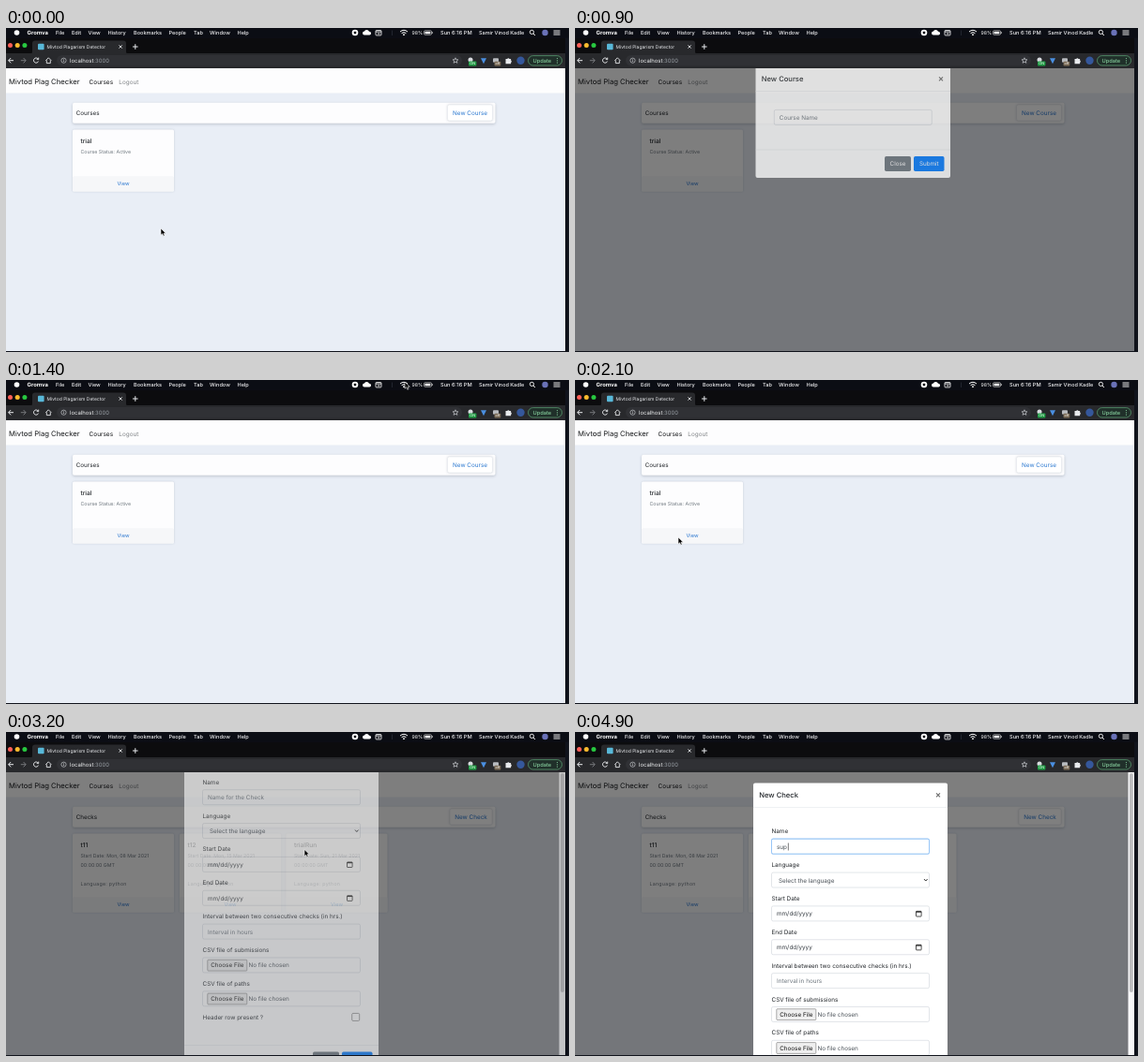
An HTML page that plays this animation: 600 by 346 pixels, repeating every 5000 ms.

```html
<!DOCTYPE html>
<html lang="en">
<head>
<meta charset="utf-8">
<title>Plag Checker</title>
<style>
html, body { margin: 0; width: 100%; height: 100%; overflow: hidden; background: #0b0d14; }
svg { display: block; width: 100%; height: 100%; }
text { font-family: Inter, "Liberation Sans", sans-serif; text-rendering: geometricPrecision; white-space: pre; }
.lift { filter: drop-shadow(0 1.5px 1.6px rgba(40, 50, 70, .24)); }
.soft { filter: drop-shadow(0 .5px .8px rgba(40, 50, 70, .18)); }
</style>
</head>
<body>
<svg id="stage" viewBox="0 0 600 346"></svg>
<script>
const INK = '#212529', GREY = '#6c757d', BLUE = '#2b78d0', LINE = '#ced4da';
const USER = 'Samir Vinod Kadle';

// y is the vertical middle of the capitals
const text = (x, y, s, size = 6.4, fill = INK, more = '') =>
  `<text x="${x}" y="${y + size * .36}" font-size="${size}" fill="${fill}" ${more}>${s}</text>`;
const rect = (x, y, w, h, fill, r = 0, more = '') =>
  `<rect x="${x}" y="${y}" width="${w}" height="${h}" fill="${fill}" rx="${r}" ${more}/>`;
const dot = (x, y, r, fill, more = '') => `<circle cx="${x}" cy="${y}" r="${r}" fill="${fill}" ${more}/>`;
const line = (d, stroke = '#e8eaed', w = .9, more = '') =>
  `<path d="${d}" fill="none" stroke="${stroke}" stroke-width="${w}" ${more}/>`;
const group = (id, body, more = '') => `<g id="${id}" ${more}>${body}</g>`;
const mid = 'text-anchor="middle"', medium = 'font-weight="500"', bold = 'font-weight="600"';

function menuBar() {
  const items = [[53, 'File'], [70, 'Edit'], [87.5, 'View'], [108.5, 'History'], [136, 'Bookmarks'],
    [173.5, 'People'], [200, 'Tab'], [217, 'Window'], [246.5, 'Help']];
  return rect(0, 0, 600, 10.5, '#0b0d14') + dot(11.5, 5, 2.8, '#fff') +
    text(22.5, 5, 'Gromva', 5.9, '#fff', 'font-weight="700"') +
    items.map(([x, s]) => text(x, 5, s, 5.6, '#f2f2f4', medium)).join('') +
    dot(372, 5, 3.3, '#fff') + rect(370.8, 3.8, 2.4, 2.4, '#0b0d14', .5) +
    '<path d="M382 7.5a2 2 0 0 1 0-4a2.8 2.8 0 0 1 5 .2a1.9 1.9 0 0 1 .3 3.8z" fill="#fff"/>' +
    rect(394, 2.5, 6, 5.4, 'none', .8, 'stroke="#fff" stroke-width=".8"') + line('M394 4h6M396 6h2.5', '#fff') +
    rect(411, 2.5, 1, 5.5, '#22252e') +
    line('M420 4q4-3.4 8 0M421.6 5.6q2.4-2 4.8 0', '#fff', 1) + dot(424, 7.2, .9, '#fff') +
    text(432.5, 5, '98%', 5.2, '#fff') +
    rect(445.5, 2.8, 8, 4.4, 'none', 1, 'stroke="#ccc" stroke-width=".7"') +
    rect(446.5, 3.8, 5.8, 2.4, '#fff') + rect(454.2, 4.2, .8, 1.6, '#ccc') +
    text(463, 5, 'Sun 6:16 PM', 5.7, '#f2f2f4', medium) + text(504, 5, USER, 5.5, '#f2f2f4', medium) +
    dot(560.4, 4.4, 2.1, 'none', 'stroke="#fff" stroke-width=".9"') + line('M562 6l2 2', '#fff') +
    dot(574.5, 5, 3.2, '#6a72b8') + line('M583.5 3h7M583.5 5h7M583.5 7h7', '#fff', .9);
}

function browser() {
  const lights = ['#ff5f57', '#febc2e', '#28c840'];
  return rect(0, 10.5, 596, 17, '#0c0c0e') +
    lights.map((c, i) => dot(4.5 + i * 7.7, 18.5, 2.5, c)).join('') +
    '<path d="M26 27.5q2 0 2-2v-9q0-3 3-3h94q3 0 3 3v9q0 2 2 2z" fill="#28292c"/>' +
    rect(34, 16.7, 6.6, 6.6, '#58b8d8', 1) +
    text(43.5, 20, 'Mivtod Plagarism Detector', 5, '#e8eaed') +
    line('M120.5 18.4l3.2 3.2m0-3.2l-3.2 3.2') + line('M135 20h5.6M137.8 17.2v5.6', '#e8eaed', 1) +
    rect(0, 27, 596, 16, '#28292c') + rect(54, 29, 432, 11.4, '#303135', 5.7) +
    line('M8 34.7H2.8M5.2 32l-2.6 2.7l2.6 2.7', '#e8eaed', 1) +
    line('M15.8 34.7H21M18.6 32l2.6 2.7l-2.6 2.7', '#77797d', 1) +
    line('M34.3 33.2a2.6 2.6 0 1 0 .2 2.4', '#e8eaed', 1) + line('M34.7 31.6v2h-2') +
    line('M42.3 34.8l3-3l3 3M43.3 34.4v3.2h4v-3.2') +
    dot(61.5, 34.7, 2.6, 'none', 'stroke="#c4c7cb" stroke-width=".7"') + line('M61.5 34.4v1.7M61.5 33v.7', '#c4c7cb', .8) +
    text(68, 34.7, 'localhost<tspan fill="#9aa0a6">:3000</tspan>', 5.95, '#f1f3f4') +
    line('M479 31.8l.8 2h2.1l-1.6 1.4l.6 2.1l-1.9-1.2l-1.9 1.2l.6-2.1l-1.6-1.4h2.1z', '#d0d3d7', .7) +
    dot(495, 34, 2.5, '#d9dce0') + rect(493, 35.6, 8.4, 5, '#1e9b43', 1) + text(497.2, 38.1, 'ON', 3.8, '#fff', mid) +
    '<path d="M506 32.2h6l-3 6z" fill="#4a90e2"/>' +
    rect(519, 32.3, 6, 4.5, '#b9bcc0', 1) + rect(520.5, 35.8, 6.8, 4.6, '#7a6a55', 1) + text(523.9, 38.1, 'off', 3.6, '#fff', mid) +
    '<path d="M532.5 33h1.7a1.2 1.2 0 0 1 2.3 0h1.6v1.6a1.2 1.2 0 0 1 0 2.2v1.4h-5.6z" fill="#e8eaed"/>' +
    dot(548.5, 34.7, 4.2, '#35579b') +
    rect(556.5, 29.6, 36, 10.4, '#20302a', 5.2, 'stroke="#5fa878" stroke-width=".7"') +
    text(561.5, 34.8, 'Update', 5.7, '#86cf9d', medium) + [32.5, 34.8, 37.1].map(y => dot(587.5, y, .6, '#86cf9d')).join('');
}

const button = (x, w, label) =>
  rect(x, 82, w, 17, '#fff', 1.8, 'class="soft" stroke="#dfe3e8" stroke-width=".5"') +
  text(x + w / 2, 90.6, label, 6.35, BLUE, mid);

function card(x, h, title, lines) {
  return `<g class="soft">${rect(x, 108.5, 108, h, '#fdfdfe', 1.5)}</g>` +
    rect(x, 92.2 + h, 108, 16.3, '#f6f7f9', 1.5) +
    text(x + 8.5, 120.8, title, 6.6, INK, medium) +
    lines.map(([y, s, gap = 0]) => text(x + 8.5, y, s, 5.25, GREY, `letter-spacing="${gap}"`)).join('') +
    text(x + 54, 100.4 + h, 'View', 5.6, BLUE, mid);
}

const check = (x, title, date) => card(x, 84, title,
  [[132, 'Start Date: ' + date], [142, '00:00:00 GMT'], [162, 'Language: python', .28]]);

function page() {
  return rect(0, 43, 596, 302, '#e9eef6') + rect(0, 43, 596, 26.5, '#fdfdfe') +
    text(3, 57.6, 'Mivtod Plag Checker', 7.7, '#151719') + text(88.5, 57.6, 'Courses', 6.5, '#151719') +
    text(120.3, 57.6, 'Logout', 6.4, '#7f8285') +
    rect(71, 79.8, 450.5, 22, '#fdfdfe', 1.8, 'class="lift"') +
    group('courses', text(74.7, 90.7, 'Courses', 6.3) + button(470.5, 48, 'New Course') +
      card(71, 66, 'trial', [[132, 'Course Status: Active']])) +
    group('checks', text(74.7, 90.7, 'Checks', 6.3) + button(473, 45, 'New Check') +
      check(71, 't11', 'Mon, 08 Mar 2021') + check(185, 't12', 'Mon, 15 Mar 2021') +
      check(298.5, 'trialRun', 'Sun, 21 Mar 2021'));
}

const field = (x, y, hint = '', pad = 5.5, fill = GREY) =>
  rect(x, y, 168, 16, '#fff', 1.7, `stroke="${LINE}" stroke-width=".6"`) + text(x + pad, y + 8.2, hint, 6.35, fill);

// dialog shell with its header and footer
function dialog(x, y, w, h, title, body) {
  const foot = y + h - 16.5;
  return rect(x, y, w, h, '#fff', 2) + text(x + 6.3, y + 12.9, title, 7.6, INK, medium) +
    line(`M${x + w - 12} ${y + 10.8}l4 4m0-4l-4 4`, '#6b6b6b', 1.1) +
    line(`M${x} ${y + 26}h${w}M${x} ${y + h - 30}h${w}`, '#dee2e6', .5) + body +
    [[-70, 28, 'Close', GREY], [-39, 32.5, 'Submit', '#007bff']].map(([dx, bw, s, c]) =>
      rect(x + w + dx, foot - 6.5, bw, 16, c, 1.7) + text(x + w + dx + bw / 2, foot + 1.6, s, 6.3, '#fff', mid)).join('');
}

function checkForm() {
  const x = 209.5, top = i => 114.2 + i * 35.85;
  const date = y => field(x, y, 'mm/dd/yyyy', 5.5, '#343a40') +
    rect(363.5, y + 5.5, 5.6, 5.6, 'none', .5, 'stroke="#222" stroke-width=".8"') + line(`M363.5 ${y + 6.2}h5.6`, '#222', 1.2);
  const file = y => field(x, y, 'No file chosen', 49, '#495057') +
    rect(x + 5.3, y + 2.3, 42, 11.8, '#efefef', .8, 'stroke="#767676" stroke-width=".6"') +
    text(x + 26.3, y + 8.2, 'Choose File', 6.3, '#111', mid);
  const rows = [
    ['Name', y => group('name', field(x, y))],
    ['Language', y => field(x, y, 'Select the language', 7.5, '#495057') + line(`M372 ${y + 7}l1.8 2l1.8-2`, '#333', 1)],
    ['Start Date', date], ['End Date', date],
    ['Interval between two consecutive checks (in hrs.)', y => field(x, y, 'Interval in hours')],
    ['CSV file of submissions', file], ['CSV file of paths', file],
    ['Header row present ?', y => rect(368.7, y - 12.2, 8, 8, '#fff', 1.2, 'stroke="#767676" stroke-width=".7"')]
  ];
  return rows.map(([s, draw], i) => text(x, top(i) - 8.2, s, 6.35) + draw(top(i))).join('');
}

const ARROW = '<path d="M0 0v7.2l1.7-1.5l1.1 2.5l1.3-.6l-1.1-2.4h2.3z" fill="#000" stroke="#fff" stroke-width=".6"/>';
const HAND = '<path d="M-.8 4.8V.7q.8-1.2 1.6 0V3l2.7.5q.9.2.8 1.2l-.7 3.4h-3.9l-2.4-3q.6-1.3 1.9-.3z" fill="#fff" stroke="#000" stroke-width=".7"/>';
const BEAM = '<path d="M-1.5-3.8Q0-3.8 0-2.8Q0-3.8 1.5-3.8M0-2.8V2.8M-1.5 3.8Q0 3.8 0 2.8Q0 3.8 1.5 3.8" fill="none" stroke="#111" stroke-width=".8"/>';

const stage = document.getElementById('stage');
stage.innerHTML =
  `<clipPath id="view">${rect(0, 43, 596, 302, '#000')}</clipPath>` +
  rect(0, 0, 600, 346, '#10131b') + browser() +
  `<g clip-path="url(#view)">` + page() + group('shade', rect(0, 43, 596, 302, '#000')) +
  group('courseBox', dialog(192.5, 54.5, 207.5, 118.5, 'New Course', field(212.3, 100.4, 'Course Name'))) +
  group('checkBox', group('sheet', dialog(190, 54.5, 207, 362.5, 'New Check', checkForm())) +
    rect(589.5, 43, 6.5, 302, '#f8f8f9') + rect(591, 44, 3.8, 234, '#bdbdbf', 1.9)) +
  group('hints', '') + '</g>' + menuBar() + group('cursor', '');

const $ = id => document.getElementById(id);
const show = (id, opacity) => {
  $(id).setAttribute('opacity', opacity);
  $(id).setAttribute('display', opacity ? 'inline' : 'none');
};
const move = (id, x, y) => $(id).setAttribute('transform', `translate(${x} ${y})`);

// linear value at t; keys are [time, value]
function at(keys, t) {
  const i = keys.findIndex(k => k[0] > t);
  if (i < 0) return keys[keys.length - 1][1];
  if (i === 0) return keys[0][1];
  const [t0, a] = keys[i - 1], [t1, b] = keys[i];
  return a + (b - a) * (t - t0) / (t1 - t0);
}

const PATH = [[0, 165, 214], [200, 440, 108], [300, 440, 108], [500, 494, 91], [700, 494, 91],
  [1000, 385, 145], [1200, 345, 145], [1400, 425, 2], [1500, 410, 62], [1800, 130, 120], [2100, 110, 168],
  [2300, 165, 225], [2500, 170, 200], [2700, 126, 166], [2800, 126, 166], [3000, 494, 96], [3100, 440, 108],
  [3200, 318, 125.5], [3500, 278, 121], [3800, 267, 119], [4000, 269, 119]];
const PATH_X = PATH.map(([t, x]) => [t, x]), PATH_Y = PATH.map(([t, , y]) => [t, y]);
const SHADE = [[600, 0], [800, .5], [1200, .5], [1400, 0], [3000, 0], [3100, .5]];
const COURSE = [[800, 0], [900, .76], [1000, 1], [1200, 1], [1300, 0]];
const COURSE_Y = [[800, -29], [900, -13], [1000, 0], [1200, 0], [1300, -20]];
const CHECK = [[3100, 0], [3200, .6], [3300, 1]];
const CHECK_Y = [[3100, -92], [3200, -52.5], [3300, -7.5], [3400, 0]];

function nameField(t) {
  const typed = 'sup'.slice(0, Math.max(0, Math.floor((t - 4400) / 100)));
  const focus = t >= 3800, caret = focus && (t < 4000 || t >= 4200);
  const caretX = 215 + [0, 3.4, 7.2, 11.9][typed.length];
  return (focus ? rect(208.9, 113.6, 169.2, 17.2, '#bfdeff', 2.2) : '') +
    field(209.5, 114.2, typed || 'Name for the Check', 5.5, typed ? '#495057' : GREY) +
    (focus ? rect(209.5, 114.2, 168, 16, 'none', 1.7, 'stroke="#80bdff" stroke-width=".7"') : '') +
    (caret ? rect(caretX, 118.5, .6, 8, '#222') : '');
}

function hints(t) {
  if (t < 3800 || t >= 4700) return '';
  const all = [USER, 'Samir Kadle', 't2', 't1', 't6', 't7'];
  const list = t < 4500 ? all : all.slice(0, 2);
  return rect(209, 130.5, 168, 6.5 + list.length * 15, '#202124', 1.5, 'class="soft"') +
    list.map((s, i) => text(214, 141.6 + i * 15, s, 5.3, '#f1f3f4', bold)).join('');
}

function pointer(t) {
  const within = (a, b) => t >= a && t < b;
  if (within(800, 1000) || t >= 4500) return '';
  if (t >= 3500) return BEAM;
  return within(500, 800) || within(1000, 1300) || within(2700, 2900) || within(3000, 3100) ? HAND : ARROW;
}

function draw(now) {
  const t = Math.floor(now % 5000 / 100) * 100;
  show('courses', t < 2900 ? 1 : 0);
  show('checks', t < 2900 ? 0 : 1);
  show('shade', at(SHADE, t));
  show('courseBox', at(COURSE, t));
  move('courseBox', 0, at(COURSE_Y, t));
  show('checkBox', at(CHECK, t));
  move('sheet', 0, at(CHECK_Y, t));
  $('name').innerHTML = nameField(t);
  $('hints').innerHTML = hints(t);
  $('cursor').innerHTML = pointer(t);
  move('cursor', at(PATH_X, t), at(PATH_Y, t));
}

const start = performance.now();
function tick() {
  draw(performance.now() - start);
  requestAnimationFrame(tick);
}
tick();
</script>
</body>
</html>
```
